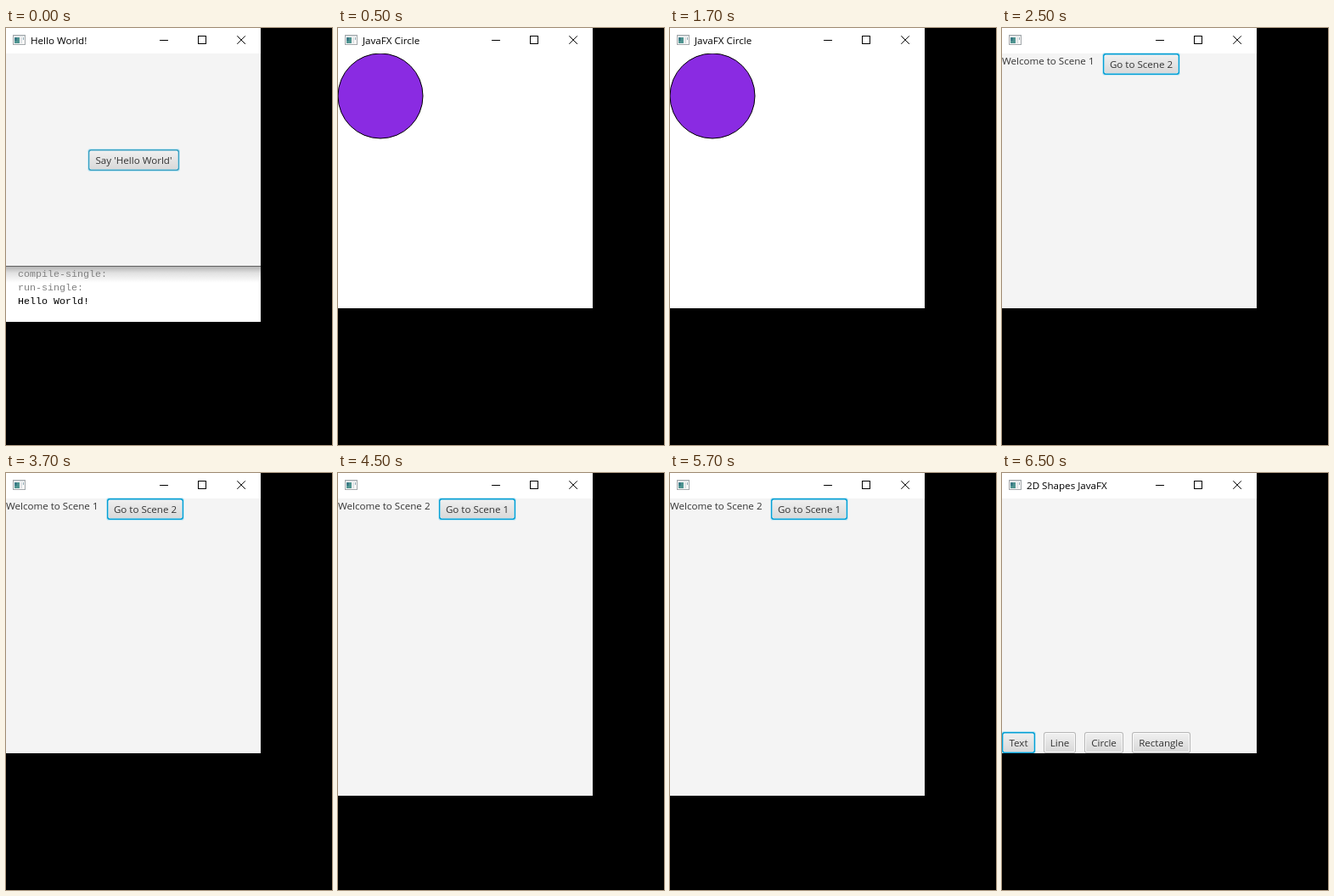
An HTML page that plays this animation: 384 px wide and 491 px high, repeating every 8 s.

```html
<!DOCTYPE html>
<html lang="en">
<head>
<meta charset="utf-8">
<title>JavaFX windows</title>
<style>
  html, body { margin: 0; width: 100%; height: 100%; overflow: hidden; background: #000; }
  svg { display: block; }
  text { font: 11.6px "Open Sans", "Noto Sans", sans-serif; fill: #333; white-space: pre; }
  .title { fill: #000; }
  .mono { font: 11.67px "Liberation Mono", "Courier New", monospace; }
</style>
</head>
<body>
<svg id="stage" width="384" height="491" viewBox="0 0 384 491">
  <defs>
    <linearGradient id="face" x2="0" y2="1">
      <stop offset="0" stop-color="#efefef"/><stop offset="1" stop-color="#d9d9d9"/>
    </linearGradient>
    <linearGradient id="shade" x2="0" y2="1">
      <stop offset="0" stop-color="#b4b4b4"/><stop offset=".4" stop-color="#e2e2e2"/>
      <stop offset="1" stop-color="#fff"/>
    </linearGradient>
    <clipPath id="pane"><rect y="30" width="300" height="300"/></clipPath>
  </defs>
</svg>
<script>
const NS = "http://www.w3.org/2000/svg";
const GREY = "#f4f4f4";
const LOOP = 8000;
const stage = document.getElementById("stage");

function add(parent, tag, attrs, content) {
  const el = document.createElementNS(NS, tag);
  for (const key in attrs) el.setAttribute(key, attrs[key]);
  if (content) el.textContent = content;
  return parent.appendChild(el);
}

const box = (g, x, y, width, height, fill, more) =>
  add(g, "rect", { x, y, width, height, fill, ...more });

const label = (g, x, y, content, more) => add(g, "text", { x, y, ...more }, content);

function button(g, x, y, w, content, focus) {
  const h = 25;
  if (focus) box(g, x - 1, y - 1, w + 2, h + 2, "#bfe6f3", { rx: 3.5 });
  box(g, x, y, w, h, focus || "#b6b6b6", { rx: 3 });
  const b = focus ? 1.4 : 1;
  box(g, x + b, y + b, w - 2 * b, h - 2 * b, "#fafafa", { rx: 2 });
  box(g, x + 2, y + 2, w - 4, h - 4, "url(#face)", { rx: 1.5 });
  label(g, x + w / 2, y + 17, content, { "text-anchor": "middle" });
}

function icon(g) {
  box(g, 8.5, 8.5, 14, 11, "#f6f6f6", { stroke: "#a3a8ab" });
  box(g, 9, 9, 13, 1, "#d4dade");
  box(g, 10, 11, 6, 7, "#4f9490");
  box(g, 10, 11, 3, 4, "#3b7a86");
  box(g, 17, 11, 2, 7, "#dfe3e5");
  box(g, 20, 11, 1, 3, "#8fa9b5");
}

function makeWindow(title, height, fill) {
  const g = add(stage, "g", { visibility: "hidden" });
  box(g, 0, 0, 300, height, fill);
  box(g, 0, 0, 300, 30, "#fff");
  icon(g);
  label(g, 29, 19, title, { class: "title" });
  box(g, 181, 14, 10, 1, "#000");
  box(g, 226.5, 9.5, 9, 9, "none", { stroke: "#000" });
  add(g, "path", { d: "M272.3 9.3l9.6 9.6m0-9.6l-9.6 9.6", stroke: "#000", fill: "none" });
  return g;
}

function hello() {
  const g = makeWindow("Hello World!", 280, GREY);
  box(g, 0, 280, 300, 66, "#fff");
  box(g, 0, 281, 300, 19, "url(#shade)");
  box(g, 0, 280, 300, 1, "#626262");
  button(g, 97, 143, 107, "Say 'Hello World'", "#3a9fc0");
  [["compile-single:", "#808080"], ["run-single:", "#808080"], ["Hello World!", "#000"]]
    .forEach(([line, color], i) =>
      label(g, 14, 293 + 16 * i, line, { class: "mono", style: "fill:" + color }));
  return g;
}

function circle() {
  const g = makeWindow("JavaFX Circle", 330, "#fff");
  add(g, "circle", {
    cx: 50, cy: 80, r: 50, fill: "#8a2be2", stroke: "#000", "clip-path": "url(#pane)"
  });
  return g;
}

function scene(here, there, height) {
  const g = makeWindow("", height, GREY);
  label(g, 0, 43, "Welcome to Scene " + here);
  button(g, 119, 30, 90, "Go to Scene " + there, "#039ed3");
  return g;
}

function shapes() {
  const g = makeWindow("2D Shapes JavaFX", 330, GREY);
  button(g, 0, 305, 39, "Text", "#039ed3");
  button(g, 49, 305, 38, "Line");
  button(g, 97, 305, 46, "Circle");
  button(g, 153, 305, 69, "Rectangle");
  box(g, 0, 330, 300, 2, "#000");
  return g;
}

const steps = [
  [0, hello()],
  [500, circle()],
  [2500, scene(1, 2, 330)],
  [4500, scene(2, 1, 380)],
  [6500, shapes()]
];

let shown;
const start = performance.now();

function draw(now) {
  const t = Math.max(0, now - start) % LOOP;
  const next = steps.filter(([at]) => at <= t).pop()[1];
  if (next !== shown) {
    if (shown) shown.setAttribute("visibility", "hidden");
    next.setAttribute("visibility", "visible");
    shown = next;
  }
  requestAnimationFrame(draw);
}
draw(start);
</script>
</body>
</html>
```
